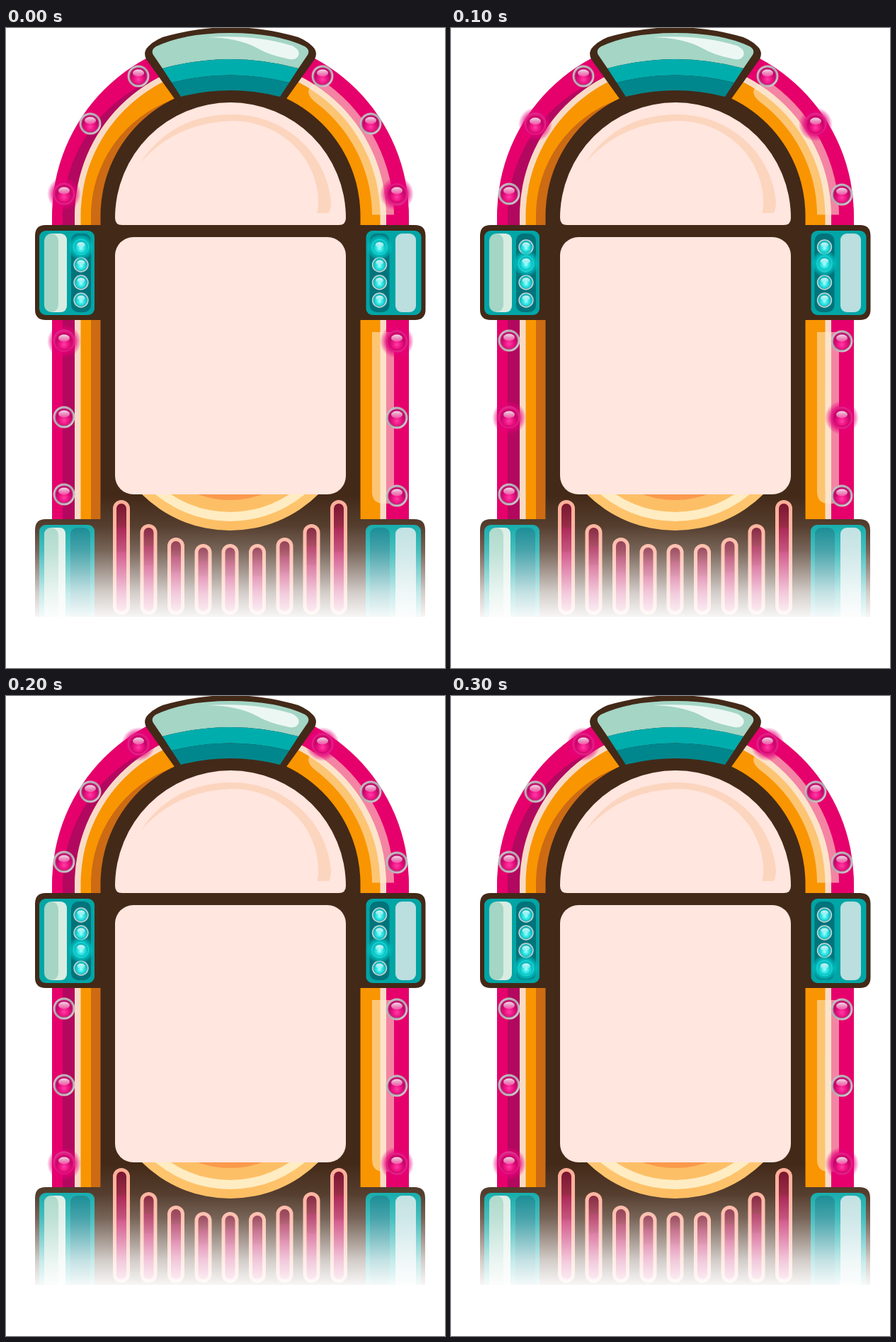
An HTML page without scripts that plays this animation: 620x903 px, repeating every 0.4 s.

```html
<!DOCTYPE html>
<html lang="en">
<head>
<meta charset="utf-8">
<title>Jukebox</title>
<style>
  html, body { margin: 0; width: 100%; height: 100%; overflow: hidden; background: #fff; }
  svg { display: block; width: 620px; height: 903px; }

  .lit { opacity: 0; animation: blink 400ms step-end infinite; }
  .long { animation-name: blink-long; }
  .t1 { animation-delay: -300ms; }
  .t2 { animation-delay: -200ms; }
  .t3 { animation-delay: -100ms; }
  @keyframes blink { 0% { opacity: 1; } 25%, 100% { opacity: 0; } }
  @keyframes blink-long { 0% { opacity: 1; } 50%, 100% { opacity: 0; } }

  .brown { fill: #432918; }
  .teal { fill: #00a5a5; }
  .deep { fill: #00737b; }
  .mint { fill: #a4d5c5; }
  .pale { fill: #d8ece2; }
  .ice { fill: #bbdedf; }
  .panel { fill: #ffe6de; }
  .tubes { fill: url(#tube); stroke: #ffad96; stroke-width: 5; }
</style>
</head>
<body>
<svg viewBox="0 0 620 903">
  <defs>
    <linearGradient id="tube" x2="0" y2="1">
      <stop offset="0" stop-color="#74102a"/>
      <stop offset=".22" stop-color="#8c1532"/>
      <stop offset=".24" stop-color="#a00f42"/>
      <stop offset=".44" stop-color="#ae124c"/>
      <stop offset=".46" stop-color="#c0155c"/>
      <stop offset="1" stop-color="#cc1868"/>
    </linearGradient>
    <linearGradient id="disc">
      <stop offset=".1" stop-color="#ffc873"/>
      <stop offset=".5" stop-color="#fdbd62"/>
      <stop offset=".9" stop-color="#ffc873"/>
    </linearGradient>
    <linearGradient id="silver" x2="1" y2="1">
      <stop offset="0" stop-color="#c9c3c6"/>
      <stop offset=".5" stop-color="#b0aaae"/>
      <stop offset="1" stop-color="#d4ced1"/>
    </linearGradient>
    <linearGradient id="gloss" x2="0" y2="1">
      <stop offset="0" stop-color="#fff" stop-opacity=".85"/>
      <stop offset="1" stop-color="#fff" stop-opacity=".25"/>
    </linearGradient>
    <radialGradient id="pink" cy=".7">
      <stop offset="0" stop-color="#ff3fa6"/>
      <stop offset=".55" stop-color="#ee1283"/>
      <stop offset="1" stop-color="#c4066a"/>
    </radialGradient>
    <radialGradient id="cyan" cy=".6">
      <stop offset="0" stop-color="#b0fffb"/>
      <stop offset=".45" stop-color="#34e9e8"/>
      <stop offset="1" stop-color="#0fbcc2"/>
    </radialGradient>
    <radialGradient id="pinkHalo">
      <stop offset=".55" stop-color="#e6007a"/>
      <stop offset=".72" stop-color="#e6007a" stop-opacity=".6"/>
      <stop offset="1" stop-color="#e6007a" stop-opacity="0"/>
    </radialGradient>
    <radialGradient id="cyanHalo">
      <stop offset=".5" stop-color="#00c9c8"/>
      <stop offset=".7" stop-color="#00c9c8" stop-opacity=".7"/>
      <stop offset="1" stop-color="#00c9c8" stop-opacity="0"/>
    </radialGradient>
    <linearGradient id="mist" gradientUnits="userSpaceOnUse" x1="0" x2="0" y1="660" y2="831">
      <stop offset="0" stop-color="#fff" stop-opacity="0"/>
      <stop offset=".25" stop-color="#fff" stop-opacity=".1"/>
      <stop offset=".45" stop-color="#fff" stop-opacity=".28"/>
      <stop offset=".8" stop-color="#fff" stop-opacity=".77"/>
      <stop offset="1" stop-color="#fff" stop-opacity=".96"/>
    </linearGradient>

    <g id="bulb">
      <circle r="14" fill="#b9337c" stroke="url(#silver)" stroke-width="2.8"/>
      <circle r="11.3" fill="url(#pink)"/>
      <ellipse cy="-4.500" rx="8" ry="5" fill="url(#gloss)"/>
    </g>
    <g id="bulbLit">
      <circle r="24" fill="url(#pinkHalo)"/>
      <circle r="14" fill="#d80a72" stroke="#ec3f98" stroke-opacity=".6"/>
      <circle r="11.3" fill="url(#pink)"/>
      <ellipse cy="-4.500" rx="8" ry="5" fill="url(#gloss)"/>
    </g>
    <g id="lamp">
      <circle r="9.8" fill="#0f9da3" stroke="#b9d3d1" stroke-width="1.8"/>
      <circle r="8.4" fill="url(#cyan)"/>
      <ellipse cy="-3" rx="5.5" ry="3.6" fill="url(#gloss)"/>
    </g>
    <g id="lampLit">
      <circle r="19" fill="url(#cyanHalo)"/>
      <circle r="10.6" fill="#00bfc0" stroke="#2fdcd9"/>
      <circle r="9" fill="url(#cyan)"/>
      <ellipse cy="-3" rx="5.8" ry="3.8" fill="url(#gloss)"/>
    </g>
    <g id="lamps">
      <rect class="deep" x="92" y="290" width="28" height="111" rx="10"/>
      <use href="#lamp" x="106" y="309"/><use href="#lamp" x="106" y="334"/>
      <use href="#lamp" x="106" y="359"/><use href="#lamp" x="106" y="384"/>
    </g>

    <g id="sideBox">
      <path class="brown" d="M136 278H56Q41 278 41 293V397Q41 412 56 412H136Z"/>
      <rect class="teal" x="47" y="286" width="78" height="119" rx="9"/>
    </g>
    <g id="foot">
      <path class="brown" d="M136 693H56Q41 693 41 708V840H136Z"/>
      <rect class="teal" x="47" y="701" width="78" height="150" rx="9"/>
      <rect x="91" y="705" width="28" height="140" rx="9" fill="#00808a"/>
    </g>
  </defs>

  <!-- cabinet rings -->
  <path fill="#e6006c" d="M65 700V265A252 252 0 0 1 569 265V700Z"/>
  <path fill="#b3085f" d="M80 700V265A208 208 0 0 1 213 71L230 90L110 265V700Z"/>
  <path fill="#f8dbc6" d="M97 700V265A220 220 0 0 1 537 265V700Z"/>
  <path fill="#f99500" d="M105.500 700V265A211.500 211.500 0 0 1 528.500 265V700Z"/>
  <path fill="#cc6b13" d="M120 700V265A174 174 0 0 1 236 101L250 120L140 265V700Z"/>
  <g fill="#ffebcf" opacity=".56">
    <path d="M517 263.500A200 200 0 0 0 436 104Q422 92 430 83Q438 75 455 80A231 231 0 0 1 548 263.500Z"/>
    <path d="M517 429H548V671H533Q517 671 517 654Z"/>
  </g>
  <path class="brown" d="M133.500 840V265A183.500 183.500 0 0 1 500.500 265V840Z"/>

  <!-- crown -->
  <path class="brown" d="M241 104L198 44Q193 34 201 26Q213 14 232 10Q274 -1 317 -1Q360 -1 402 10Q421 14 433 26Q441 34 436 44L393 104Q317 84 241 104Z"/>
  <path class="mint" d="M208 38Q204 31 212 26Q252 7 317 7Q382 7 422 26Q430 31 426 38L413 57Q317 31 221 57Z"/>
  <path fill="#00adad" d="M221 57Q317 31 413 57L400 77Q317 56 234 77Z"/>
  <path fill="#00878d" d="M234 77Q317 56 400 77L387 97Q317 79 247 97Z"/>
  <path fill="#ecf7f4" d="M285 13Q353 9 404 25Q416 31 413 39Q409 47 396 43Q371 38 354 28Q328 14 285 13Z"/>

  <!-- windows -->
  <path class="panel" d="M154 268A163 163 0 0 1 480 268Q480 278 470 278H164Q154 278 154 268Z"/>
  <path fill="#fcd5bf" d="M190 190Q235 122 320 122A139 135 0 0 1 459 245Q459 255 456 261H439Q441 257 441 246A121 115 0 0 0 320 131Q240 133 190 190Z"/>

  <!-- grille -->
  <g class="tubes">
    <rect x="153.500" y="668.500" width="19" height="157" rx="9.500"/>
    <rect x="192" y="702.500" width="19" height="123" rx="9.500"/>
    <rect x="230.500" y="721.500" width="19" height="104" rx="9.500"/>
    <rect x="269" y="730.500" width="19" height="95" rx="9.500"/>
    <rect x="307" y="730.500" width="19" height="95" rx="9.500"/>
    <rect x="345.500" y="730.500" width="19" height="95" rx="9.500"/>
    <rect x="384" y="721.500" width="19" height="104" rx="9.500"/>
    <rect x="422" y="702.500" width="19" height="123" rx="9.500"/>
    <rect x="460.500" y="668.500" width="19" height="157" rx="9.500"/>
  </g>

  <!-- feet -->
  <use href="#foot"/>
  <use href="#foot" transform="matrix(-1 0 0 1 633 0)"/>
  <rect class="mint" x="54" y="705" width="30" height="140" rx="9"/>
  <path class="pale" d="M62 705H75Q84 705 84 714V840H74V717Q74 705 62 705Z"/>
  <rect class="ice" x="550" y="705" width="29" height="140" rx="9"/>

  <path fill="url(#mist)" d="M134 660H500V693H600V831H34V693H134Z"/>
  <rect y="831" width="620" height="72" fill="#fff"/>

  <!-- disc behind the main window -->
  <circle cx="316.500" cy="531" r="178" fill="url(#disc)"/>
  <circle cx="316.500" cy="531" r="165" fill="#ffecc2"/>
  <circle cx="316.500" cy="531" r="152" fill="#fdbf66"/>
  <circle cx="316.500" cy="531" r="135" fill="#fa9a4b"/>
  <path class="brown" d="M134 290H500V656H134Z"/>
  <path class="panel" d="M154 278"/>
  <rect class="panel" x="154" y="295" width="326" height="363" rx="26"/>

  <!-- side boxes -->
  <use href="#sideBox"/>
  <use href="#sideBox" transform="matrix(-1 0 0 1 633.500 0)"/>
  <rect class="mint" x="54" y="290" width="32" height="111" rx="10"/>
  <path class="pale" d="M62 290H76Q86 290 86 300V391Q86 401 76 401H62Q74 401 74 389V302Q74 290 62 290Z"/>
  <rect class="ice" x="550" y="290" width="29" height="111" rx="9"/>
  <use href="#lamps"/>
  <use href="#lamps" x="421.500"/>

  <!-- resting bulbs -->
  <use href="#bulb" x="187" y="68"/><use href="#bulb" x="447" y="68"/>
  <use href="#bulb" x="119" y="135"/><use href="#bulb" x="515" y="135"/>
  <use href="#bulb" x="82" y="234"/><use href="#bulb" x="552" y="235"/>
  <use href="#bulb" x="82" y="441"/><use href="#bulb" x="552" y="442"/>
  <use href="#bulb" x="82" y="549"/><use href="#bulb" x="552" y="550"/>
  <use href="#bulb" x="82" y="658"/><use href="#bulb" x="552" y="660"/>

  <!-- chasing lights -->
  <g class="lit">
    <use href="#bulbLit" x="82" y="234"/><use href="#bulbLit" x="552" y="234"/>
    <use href="#bulbLit" x="82" y="442"/><use href="#bulbLit" x="552" y="442"/>
    <use href="#lampLit" x="106" y="309"/><use href="#lampLit" x="527.500" y="309"/>
  </g>
  <g class="lit t1">
    <use href="#bulbLit" x="119" y="136"/><use href="#bulbLit" x="515" y="136"/>
    <use href="#bulbLit" x="82" y="550"/><use href="#bulbLit" x="552" y="550"/>
    <use href="#lampLit" x="106" y="332"/><use href="#lampLit" x="527.500" y="332"/>
  </g>
  <g class="lit long t2">
    <use href="#bulbLit" x="187" y="68"/><use href="#bulbLit" x="447" y="68"/>
    <use href="#bulbLit" x="82" y="660"/><use href="#bulbLit" x="552" y="660"/>
  </g>
  <g class="lit t2">
    <use href="#lampLit" x="106" y="358"/><use href="#lampLit" x="527.500" y="358"/>
  </g>
  <g class="lit t3">
    <use href="#lampLit" x="106" y="384"/><use href="#lampLit" x="527.500" y="384"/>
  </g>
</svg>
</body>
</html>
```
